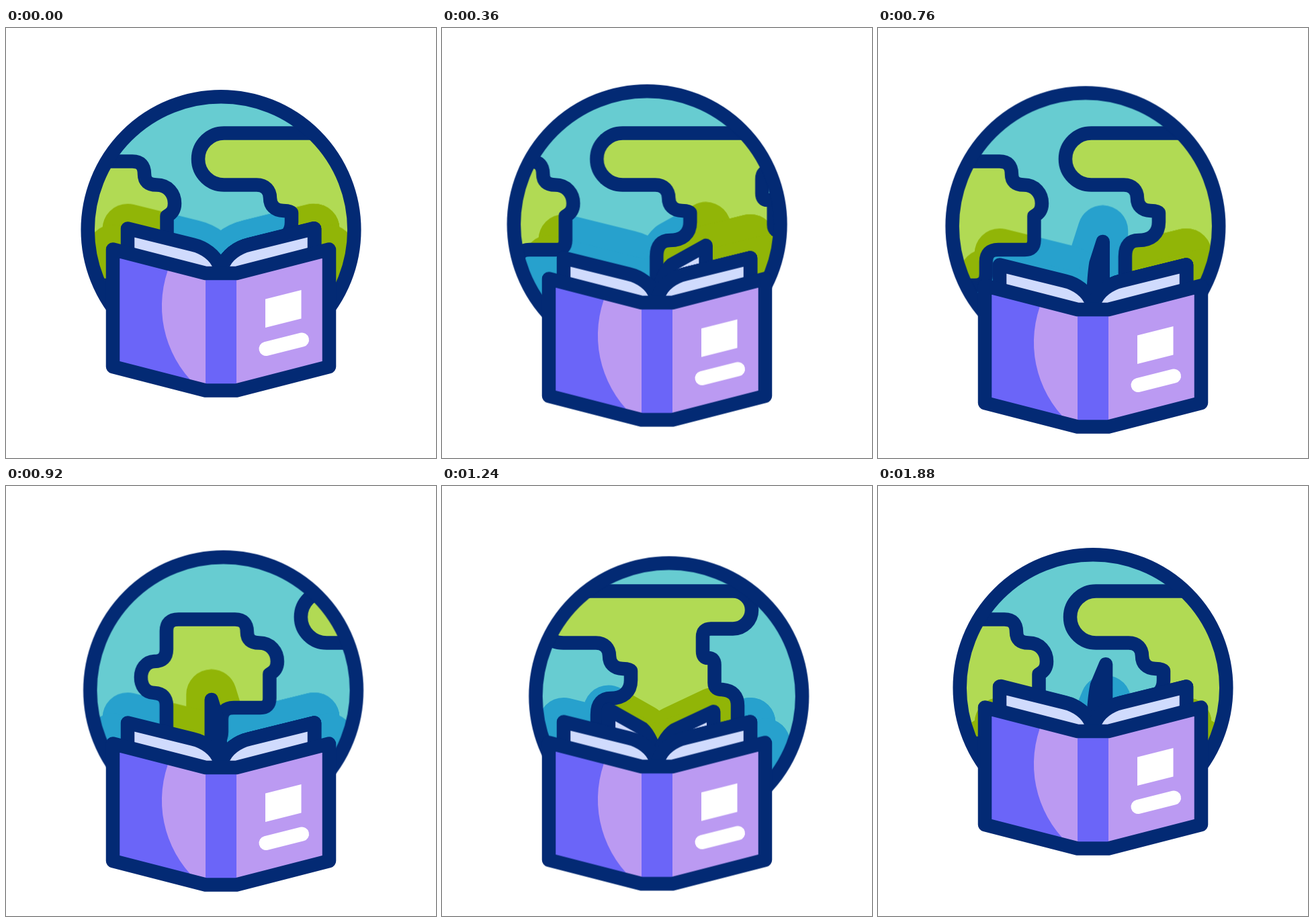
These frames come from a looping animation (640 by 640 pixels, 2.4 s). An HTML page without scripts:

```html
<!DOCTYPE html>
<html lang="en">
<head>
<meta charset="utf-8">
<title>Globe and book</title>
<style>
  html, body { margin: 0; width: 100%; height: 100%; overflow: hidden; background: #fff; }
  svg { display: block; width: 100vw; height: 100vh; }
  .line { stroke: #032a74; stroke-width: 20.5; stroke-linejoin: round; stroke-linecap: round; }
  .halo { stroke-width: 75; stroke-linejoin: round; }

  .globe, .drop, .spin {
    animation: 2400ms cubic-bezier(.333, 0, .667, 1) infinite;
  }
  .globe { animation-name: sway; }
  .drop { animation-name: drop; }
  .spin { animation-name: spin; }

  @keyframes sway {
    0%, 69.4%, 100% { transform: translate(0, 0); }
    22.1%, 24.2% { transform: translate(-19.5px, -10.8px); }
    49%, 49.2% { transform: translate(18.5px, 13px); }
  }
  @keyframes drop {
    0%, 75.4%, 100% { transform: translate(0, 0); }
    20.9%, 49.1% { transform: translate(0, 54px); }
  }
  /* a short swing back, then one full turn of 700px */
  @keyframes spin {
    0% { transform: translate(0, 0); }
    18.75%, 25.83% { transform: translate(-62px, 0); }
    61.67%, 100% { transform: translate(700px, 0); }
  }

  .right, .leaf { d: path("M459 298.5L362 322.5C345 326.5 328 338 322 355L320 380L459 350Z"); }
  .left { d: path("M181 298.5L278 322.5C295 326.5 312 338 318 355L320 380L181 350Z"); }
  .leaf { animation: flip 2400ms linear 14ms infinite backwards; }
  .second { animation-delay: 374ms; }
  .third { animation-delay: 734ms; }

  @keyframes flip {
    0% { d: path("M459 298.5L362 322.5C345 326.5 328 338 322 355L320 380L459 350Z"); }
    13.33% { d: path("M320 260L320 293C320 305 320 330 320 352L320 380L320 350Z"); }
    26.67%, 100% { d: path("M181 298.5L278 322.5C295 326.5 312 338 318 355L320 380L181 350Z"); }
  }
</style>
</head>
<body>
<svg viewBox="0 0 640 640">
  <defs>
    <path id="land" d="M324.5 156.5H577a28 28 0 0 1 0 56H544q-12 0-12 12V246q0 10 8 10q9.500 0 9.500 10V293c0 8 5 10 11.500 10q23 2 23 24V430H375V340c0-17 8-24 20-24c18 0 30-9 30-27V275q-2-3-12-3c-13 0-20-8-20-19c0-11-7-19.500-20-19.500H324.500a38.500 38.500 0 0 1 0-77Z
      M188 198.500q18 0 18 19q0 16 18 16c17 0 27 13 27 27.500c0 10-4 15-11.500 19V316q0 14-14 14H186q-18 0-18 18V366q0 17-17 17H86V327q0-18-18-19c-14 0-20-12-20-23.500s7-23 20-23.500q18 0 18-18V216q0-17.500 18-17.500Z"/>
    <path id="cover" d="M159 329.500L297 365H343L481 329.500V504L343 539.500H297L159 504Z"/>
    <g id="leaves">
      <path class="leaf"/>
      <path class="leaf second"/>
      <path class="leaf third"/>
    </g>
    <g id="pages">
      <path class="left"/>
      <path class="right"/>
    </g>
    <g id="shade">
      <g class="drop halo">
        <use href="#leaves"/>
        <use href="#pages"/>
        <use href="#cover"/>
      </g>
    </g>
    <clipPath id="disc"><circle class="globe" cx="320" cy="300.500" r="198"/></clipPath>
    <clipPath id="ground">
      <use class="spin" href="#land"/>
      <use class="spin" href="#land" x="-700"/>
    </clipPath>
  </defs>

  <g clip-path="url(#disc)">
    <rect width="640" height="640" fill="#67ccd1"/>
    <use href="#shade" fill="#27a1cd" stroke="#27a1cd"/>
    <g clip-path="url(#ground)">
      <rect width="640" height="640" fill="#b1da54"/>
      <use href="#shade" fill="#91b507" stroke="#91b507"/>
    </g>
    <g class="spin line" fill="none">
      <use href="#land"/>
      <use href="#land" x="-700"/>
    </g>
  </g>
  <circle class="globe line" cx="320" cy="300.500" r="198.300" fill="none"/>

  <g class="drop">
    <g class="line" fill="#d0dbfd">
      <use href="#leaves"/>
      <use href="#pages"/>
    </g>
    <use href="#cover" fill="#6b65f8"/>
    <path fill="#bb9af2" d="M245 350A163 163 0 0 0 282.500 532L297 536V362ZM343 365L481 329.500V504L343 539.500Z"/>
    <path fill="#fff" d="M386 403.500L439.500 390V432.500L386 446Z"/>
    <path stroke="#fff" stroke-width="21" stroke-linecap="round" d="M387 477.500L440.500 464"/>
    <use class="line" href="#cover" fill="none"/>
  </g>
</svg>
</body>
</html>
```
